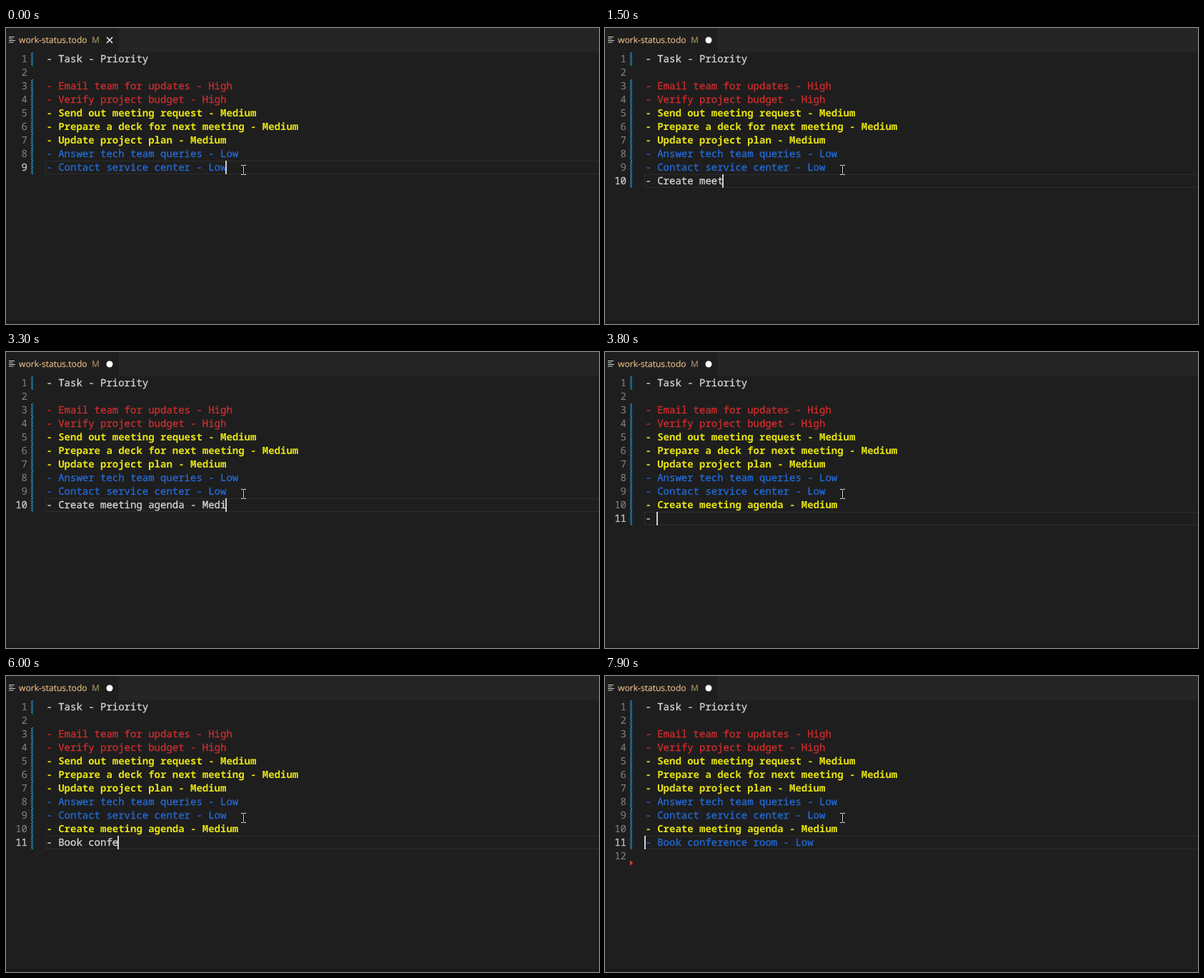
Write an HTML page that moves like this. It is 830 by 415 pixels and loops after 8000 ms.

```html
<!DOCTYPE html>
<html lang="en">
<head>
<meta charset="utf-8">
<title>Task list editor</title>
<style>
  html, body { margin: 0; width: 100%; height: 100%; overflow: hidden; background: #1e1e1e; }
  body { position: relative; text-rendering: geometricPrecision; }
  body > *, .row > * { position: absolute; }
  svg { left: 0; top: 0; }

  .tabs { left: 0; top: 0; width: 100%; height: 34px; background: #252526; }
  .tab { left: 0; top: 0; width: 158px; height: 34px; background: #1e1e1e; }
  .title, .badge { top: 0; font: 12.1px/34px "Open Sans", "Noto Sans", sans-serif; color: #e5b880; -webkit-text-stroke: .2px; }
  .title { left: 18px; }
  .badge { left: 120px; color: #a58a68; }
  .bottom { left: 0; top: 411px; width: 100%; height: 4px; background: #1a1a1a; }

  .row { left: 0; width: 100%; height: 19px; font: 14px/19px "Noto Sans Mono", "DejaVu Sans Mono", monospace; }
  .number { top: 0; left: 0; width: 30px; text-align: right; color: #858585; }
  .text { top: 0; left: 56.4px; white-space: pre; color: #d8d8d8; -webkit-text-stroke: .3px; }
  .mark {
    left: 35px; top: 0; width: 3px; height: 19px;
    background: linear-gradient(-45deg, #1b81a8 25%, #1e1e1e 25% 50%, #1b81a8 50% 75%, #1e1e1e 75%) 0 0 / 3px 3px;
  }
  .active .number { color: #c6c6c6; -webkit-text-stroke: .3px; }
  .active::before {
    content: ""; position: absolute; left: 55px; right: 0; top: 0; height: 19px;
    box-sizing: border-box; border: 1px solid #2d2d2d; border-right: 0;
  }
  .high { color: #d42d2d; }
  .medium { color: #e6e312; font-weight: 600; -webkit-text-stroke: 0; }
  .low { color: #236bd8; }
  #caret { width: 2px; height: 19px; background: #cfcfcf; }
</style>
</head>
<body>
<div class="tabs"></div>
<div class="tab"></div>
<span class="title">work-status.todo</span>
<span class="badge">M</span>
<div class="bottom"></div>
<div id="caret"></div>
<svg width="830" height="415" fill="none">
  <path d="M4 12.5h8M4 15h5.500M4 17.500h9M4 20h6.500" stroke="#d0d2d2" stroke-width="1.2"/>
  <path id="close" d="M141 13l8 8m0-8l-8 8" stroke="#fff" stroke-width="1.4"/>
  <circle id="dot" cx="145" cy="17" r="4.500" fill="#fff"/>
  <path id="deleted" d="M35 -4l4 4l-4 4z" fill="#d8393f"/>
  <g id="pointer">
    <path d="M332.500 193v12" stroke="#000" stroke-width="3"/>
    <path d="M329 192.500h3M333 192.500h3M329 205.500h3M333 205.500h3M332.500 193v12" stroke="#e8e8e8"/>
  </g>
</svg>
<script>
const LOOP = 8000, STEP = 100;
const TOP = 34, ROW = 19, LEFT = 55.4, CHAR = 8.4;

// Typing runs are [first step, last step, characters shown at the first step].
const lines = [
  { text: "- Task - Priority" },
  { text: "" },
  { text: "- Email team for updates - High", color: "high" },
  { text: "- Verify project budget - High", color: "high" },
  { text: "- Send out meeting request - Medium", color: "medium" },
  { text: "- Prepare a deck for next meeting - Medium", color: "medium" },
  { text: "- Update project plan - Medium", color: "medium" },
  { text: "- Answer tech team queries - Low", color: "low" },
  { text: "- Contact service center - Low", color: "low" },
  { text: "- Create meeting agenda - Medium", color: "medium", enter: 1, colored: 36,
    runs: [[2, 2, 2], [5, 17, 3], [18, 21, 17], [23, 28, 21], [30, 33, 27], [34, 34, 32]] },
  { text: "- Book conference room - Low", color: "low", enter: 36, colored: 78,
    runs: [[37, 37, 2], [51, 73, 3], [75, 77, 26]] },
  { text: "", enter: 79 },
];

const byId = id => document.getElementById(id);
const show = (element, visible) => element.style.display = visible ? "" : "none";
const rowTop = index => TOP + ROW * index;

function add(parent, className, text = "") {
  const element = document.createElement("div");
  element.className = className;
  element.textContent = text;
  parent.append(element);
  return element;
}

const rows = lines.map((line, i) => {
  const row = document.createElement("div");
  row.className = "row";
  row.style.top = rowTop(i) + "px";
  byId("caret").before(row);
  add(row, "number", i + 1);
  return { row, mark: add(row, "mark"), text: add(row, "text") };
});

function typedCount(line, step) {
  if (!line.runs) return line.text.length;
  const run = line.runs.findLast(([from]) => step >= from);
  return run ? run[2] + Math.min(step, run[1]) - run[0] : 0;
}

function render(step) {
  const lineCount = lines.filter(line => step >= (line.enter ?? 0)).length;
  const newest = lines[lineCount - 1];
  const justEntered = newest.enter === step;
  const staleDiff = newest.enter !== undefined && step < newest.enter + 2;
  const active = lineCount - (justEntered ? 2 : 1);

  lines.forEach((line, i) => {
    const { row, mark, text } = rows[i];
    show(row, i < lineCount);
    row.classList.toggle("active", i === active);
    text.textContent = line.text.slice(0, typedCount(line, step));
    text.className = "text " + (step >= (line.colored ?? 0) && line.color || "");
    show(mark, staleDiff ? i < lineCount - 1 : i !== 1);
  });

  const column = justEntered ? 0 : typedCount(lines[active], step);
  byId("caret").style.left = Math.floor(LEFT + CHAR * column) + "px";
  byId("caret").style.top = rowTop(active) + "px";
  byId("deleted").setAttribute("transform", `translate(0 ${rowTop(lineCount)})`);
  show(byId("deleted"), staleDiff);
  show(byId("close"), step < 1);
  show(byId("dot"), step >= 1);
}

const start = performance.now();
function tick() {
  render(Math.floor((performance.now() - start) % LOOP / STEP));
  requestAnimationFrame(tick);
}
tick();
</script>
</body>
</html>
```
